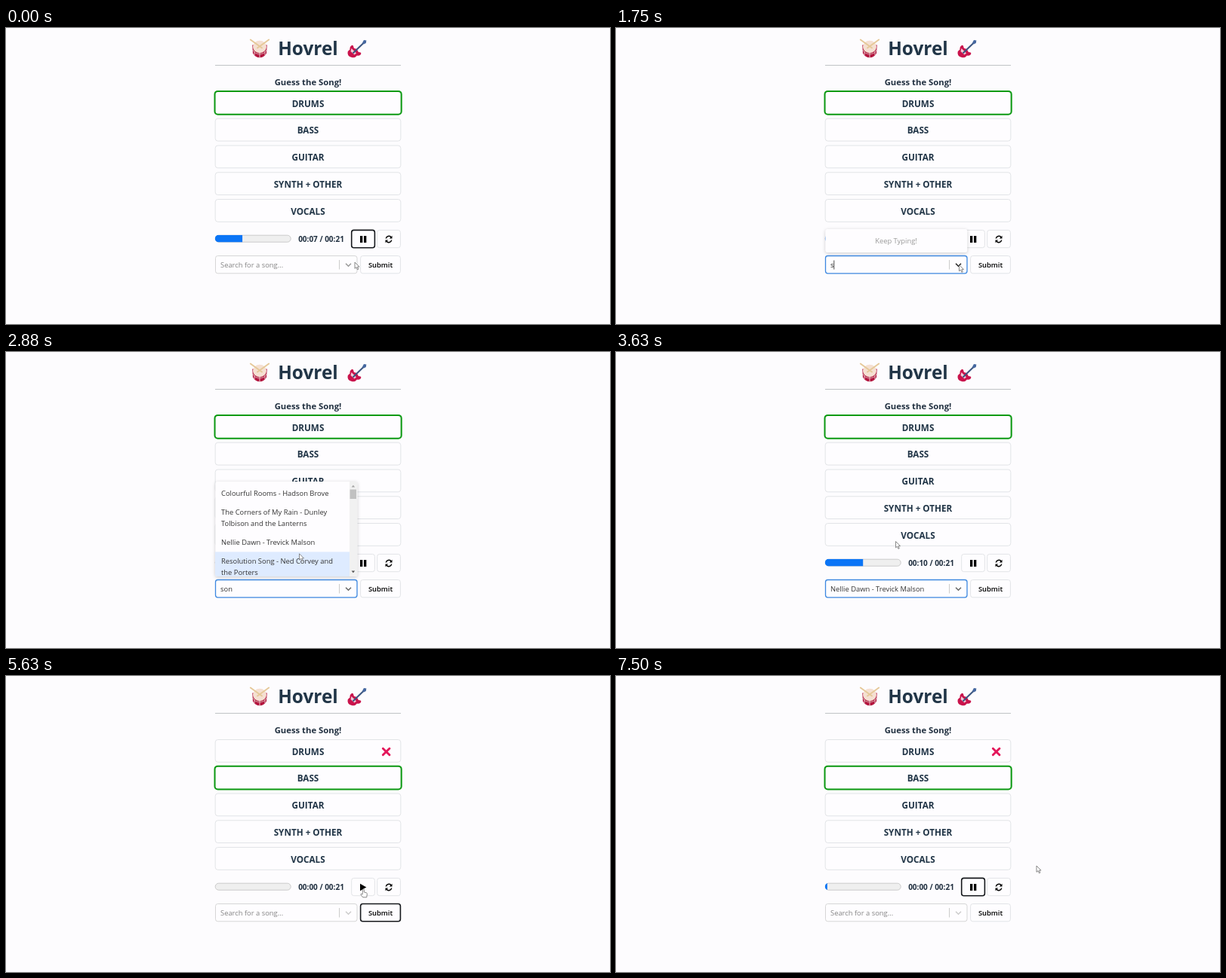
Recreate the animation shown at these times as an HTML page. Size 800 px wide and 393 px high, loop 8000 ms.

```html
<!DOCTYPE html>
<html lang="en">
<head>
<meta charset="utf-8">
<title>Guess the Song</title>
<style>
  html, body { margin: 0; width: 100%; height: 100%; overflow: hidden; background: #fdfcfe; }
  svg { display: block; width: 100%; height: 100%; }
  text { font: 9.4px "Open Sans", "Noto Sans", sans-serif; fill: #333; white-space: pre; }
  .mid { text-anchor: middle; }
  .title { font-size: 24.4px; font-weight: 700; fill: #213547; }
  .lead { font-size: 11.3px; font-weight: 700; fill: #213040; }
  .row { font-size: 11.7px; font-weight: 700; fill: #213547; }
  .box { fill: #fefdff; stroke: #e2e4e7; }
  .ring { fill: none; stroke: #0c9a12; stroke-width: 2; }
  .btn.on .box { stroke: #16191d; stroke-width: 1.6; }
  .btn text { font-weight: 600; fill: #000; }
  .time { font-size: 10px; font-weight: 700; fill: #213040; }
  .hint { fill: #858585; }
  .note { fill: #999; }
  .select .box { stroke: #d6d6d6; }
  .select.on .box { stroke: #3d88e0; stroke-width: 1.3; }
  .menu { filter: drop-shadow(0 1.5px 2px rgba(0, 0, 0, .2)); }
</style>
</head>
<body>
<svg viewBox="0 0 800 393" preserveAspectRatio="none">
  <defs>
    <clipPath id="barClip"><rect x="276.8" y="274.8" width="100.8" height="9.7" rx="4.8"/></clipPath>
    <clipPath id="listClip"><rect x="277" y="172" width="188.5" height="126" rx="3"/></clipPath>
  </defs>

  <!-- drum -->
  <g>
    <path d="M326.3 22.5l.7 11q3 5.800 9 5.800t9-5.800l.7-11z" fill="#b3163f"/>
    <path d="M329 31v5M343 31v5M336 33v6" stroke="#e6b9c2" stroke-width="1.1"/>
    <ellipse cx="336" cy="25" rx="9" ry="8.200" fill="#f5e0d2"/>
    <path d="M327 29q2 5.500 9 5.500t9-5.500" fill="none" stroke="#d9aeb0"/>
    <path d="M323.800 15.500L339 26.500M348.200 15.500L333 26.500" stroke="#e5c898" stroke-width="1.900" stroke-linecap="round"/>
  </g>
  <text class="title mid" x="400" y="36">Hovrel</text>
  <!-- guitar -->
  <g>
    <path d="M455.5 28.500q-.5-4 2.500-5.500 2.500-.5 2.300 2 .2 2.500 3.200 2.500l2.500 2.500q0 2.500 2.500 2.300 2.500.2 1.500 2.700-1.700 2.500-5 1.500-2.500 3.500-7 2.500-5-1-5.500-5.500.2-3.500 3-5z" fill="#c9134c"/>
    <path d="M457.500 27l6.500 6.500-2.500 2-5-4.500z" fill="#efcbd6"/>
    <path d="M459.500 33.500L473.500 20" stroke="#3b5580" stroke-width="2"/>
    <path d="M472 19.500l2-3.500 3.300.5-.5 3.500-2.800 1.500z" fill="#4668a0"/>
  </g>
  <path d="M277 49.5H523" stroke="#c0c4c6"/>
  <text class="lead mid" x="400" y="76">Guess the Song!</text>
  <g id="rows"></g>
  <rect class="ring" id="ring" x="276.5" width="247.2" height="30.900" rx="4"/>
  <path id="cross" d="M499.300 96.200l8.600 8.600m0-8.600l-8.600 8.600" stroke="#e3175a" stroke-width="2.900" stroke-linecap="round"/>

  <!-- player -->
  <rect x="277.2" y="275.2" width="100" height="9" rx="4.5" fill="#efefef" stroke="#c6c6c6" stroke-width=".9"/>
  <rect id="fill" x="276.8" y="274.8" height="9.7" fill="#0b75f6" clip-path="url(#barClip)"/>
  <text class="time mid" id="time" x="417.5" y="283.6"></text>
  <g class="btn" id="play">
    <rect class="box" x="457.7" y="268.4" width="30.7" height="23.3" rx="3"/>
    <path id="icon"/>
  </g>
  <g class="btn">
    <rect class="box" x="491.7" y="268.4" width="30.7" height="23.3" rx="3"/>
    <g fill="none" stroke="#000" stroke-width="1.5">
      <path d="M503.3 279.5a3.8 3.8 0 0 1 6.7-1.8M510.7 281.5a3.8 3.8 0 0 1-6.7 1.8"/>
      <path d="M511.5 275.8v3.7h-3.7zM502.5 285.2v-3.7h3.7z" fill="#000" stroke="none"/>
    </g>
  </g>

  <!-- search -->
  <g class="select" id="select">
    <rect class="box" x="277.5" y="302.5" width="187.5" height="23.3" rx="3"/>
    <text id="input" x="284" y="318"></text>
    <path id="caret" d="M0 308.5v12" stroke="#222" stroke-width=".8"/>
    <path d="M441.5 308v12.5" stroke="#ccc"/>
    <path id="chevron" d="M450 312.8l3.5 3.5 3.5-3.5" fill="none" stroke-width="1.5"/>
  </g>
  <g class="btn" id="submit">
    <rect class="box" x="469.6" y="302.5" width="52.8" height="23.3" rx="3"/>
    <text class="mid" x="496" y="318.2">Submit</text>
  </g>

  <g class="menu" id="note">
    <rect x="277.3" y="267" width="188" height="31" rx="3" fill="#fefdff"/>
    <text class="note mid" x="371" y="286">Keep Typing!</text>
  </g>
  <g class="menu" id="list">
    <rect x="277.3" y="172" width="188" height="126" rx="3" fill="#fefdff"/>
    <g clip-path="url(#listClip)">
      <rect id="hover" x="277" width="178" fill="#deebff"/>
      <g id="options"></g>
      <rect x="455" y="172" width="10.5" height="126" fill="#f1f1f1"/>
      <rect x="455.5" y="182.5" width="8.5" height="12.5" fill="#c1c1c1"/>
      <path d="M457.6 179.5l2.3-2.8 2.3 2.8z" fill="#a3a3a3"/>
      <path d="M457.6 290.5l2.3 2.8 2.3-2.8z" fill="#505050"/>
    </g>
  </g>

  <g id="cursor" fill="#fff" stroke="#6b6b6b" stroke-width=".8" stroke-linejoin="round">
    <path id="arrow" d="M0 0V8.3L2 6.6 3.4 9.8 4.8 9.2 3.4 6.1H6z"/>
    <path id="hand" d="M-1.2 5.5V.8a1 1 0 0 1 2 0V4l3 .8q1.2.4 1 1.8l-.6 4.2h-5L-3.8 7q.3-1.6 2.6-.2z"/>
  </g>
</svg>

<script>
const LOOP = 8000, STEP = 125;
const $ = id => document.getElementById(id);
const show = (id, on) => { $(id).style.display = on ? "" : "none"; };
const set = (id, attrs) => { for (const k in attrs) $(id).setAttribute(k, attrs[k]); };

const rowY = i => 84.5 + 35.75 * i;
$("rows").innerHTML = ["DRUMS", "BASS", "GUITAR", "SYNTH + OTHER", "VOCALS"].map((name, i) =>
  `<rect class="box" x="277.2" y="${rowY(i)}" width="245.6" height="29.8" rx="3.5"/>
   <text class="row mid" x="400" y="${rowY(i) + 20}">${name}</text>`).join("");

const songs = [
  ["Colourful Rooms - Hadson Brove"],
  ["The Corners of My Rain - Dunley", "Tolbison and the Lanterns"],
  ["Nellie Dawn - Trevick Malson"],
  ["Resolution Song - Ned Corvey and", "the Porters"]
];
let nextY = 176;
const slots = songs.map(lines => {
  const slot = { y: nextY, height: 9.8 + 15 * lines.length };
  nextY += slot.height;
  return slot;
});
$("options").innerHTML = songs.map((lines, i) => lines.map((line, j) =>
  `<text x="285" y="${slots[i].y + 15.3 + 15 * j}">${line}</text>`).join("")).join("");

// time, x, y of the pointer tip
const path = [
  [0, 462, 311], [375, 454.5, 314.5], [2375, 454.5, 314.5], [2875, 388.5, 267.8],
  [3250, 373, 252.5], [3625, 370.5, 251.5], [3750, 370.5, 251.5], [4250, 498, 317.5],
  [5250, 498, 317.5], [5625, 473.5, 283], [6125, 473.5, 283], [6750, 557, 252]
];

function pointer(t) {
  const i = path.findIndex(p => p[0] > t);
  if (i < 0) return path[path.length - 1].slice(1);
  const [t0, x0, y0] = path[i - 1], [t1, x1, y1] = path[i];
  const k = (t - t0) / (t1 - t0), e = k * k * (3 - 2 * k);
  return [x0 + (x1 - x0) * e, y0 + (y1 - y0) * e];
}

function progress(t) {
  if (t < 4500) return 0.36 + 0.14 * t / 3625;
  if (t < 6250) return 0;
  return t < 7000 ? 0.015 : 0.03;
}

function draw(t) {
  const focus = t >= 500 && t < 4375;
  const picked = t >= 3375 && t < 4500;
  const typed = t < 1750 || t >= 3375 ? "" : "son".slice(0, t < 2000 ? 1 : t < 2250 ? 2 : 3);
  const wrong = t >= 4500;
  const paused = wrong && t < 5875;

  set("ring", { y: rowY(t < 5000 ? 0 : 1) - 0.6 });
  show("cross", wrong);

  const part = progress(t);
  set("fill", { width: 100.8 * part });
  $("time").textContent = `00:${String(Math.floor(part * 21)).padStart(2, "0")} / 00:21`;
  set("icon", { d: paused ? "M469 275.8v9.4l8.3-4.7z" : "M469 276h3.3v9h-3.3zM474 276h3.3v9H474z" });
  $("play").classList.toggle("on", t < 500 || t >= 5875);
  $("submit").classList.toggle("on", t >= 4375 && t < 5875);

  $("select").classList.toggle("on", focus);
  $("input").textContent = picked ? songs[2][0] : typed || "Search for a song...";
  $("input").classList.toggle("hint", !picked && !typed);
  show("caret", focus && !picked && (t < 1000 || t >= 1500 && t < 2750));
  const caretX = 284 + (typed ? $("input").getComputedTextLength() + 0.3 : 0);
  set("caret", { transform: `translate(${caretX} 0)` });
  const over = t < 2500;
  set("chevron", { stroke: focus ? (over ? "#222" : "#666") : over ? "#999" : "#ccc" });

  const listed = typed === "son";
  show("note", focus && !listed && !picked);
  show("list", listed);
  const [x, y] = pointer(t);
  const hit = slots.findIndex(s => y >= s.y && y < s.y + s.height);
  set("hover", slots[t < 2625 || hit < 0 ? 0 : hit]);

  const hand = t >= 4250 && t < 6375;
  show("hand", hand);
  show("arrow", !hand);
  set("cursor", { transform: `translate(${x} ${y})` });
}

function tick() {
  const t = performance.now() % LOOP;
  draw(Math.floor(t / STEP) * STEP);
  requestAnimationFrame(tick);
}
tick();
</script>
</body>
</html>
```
